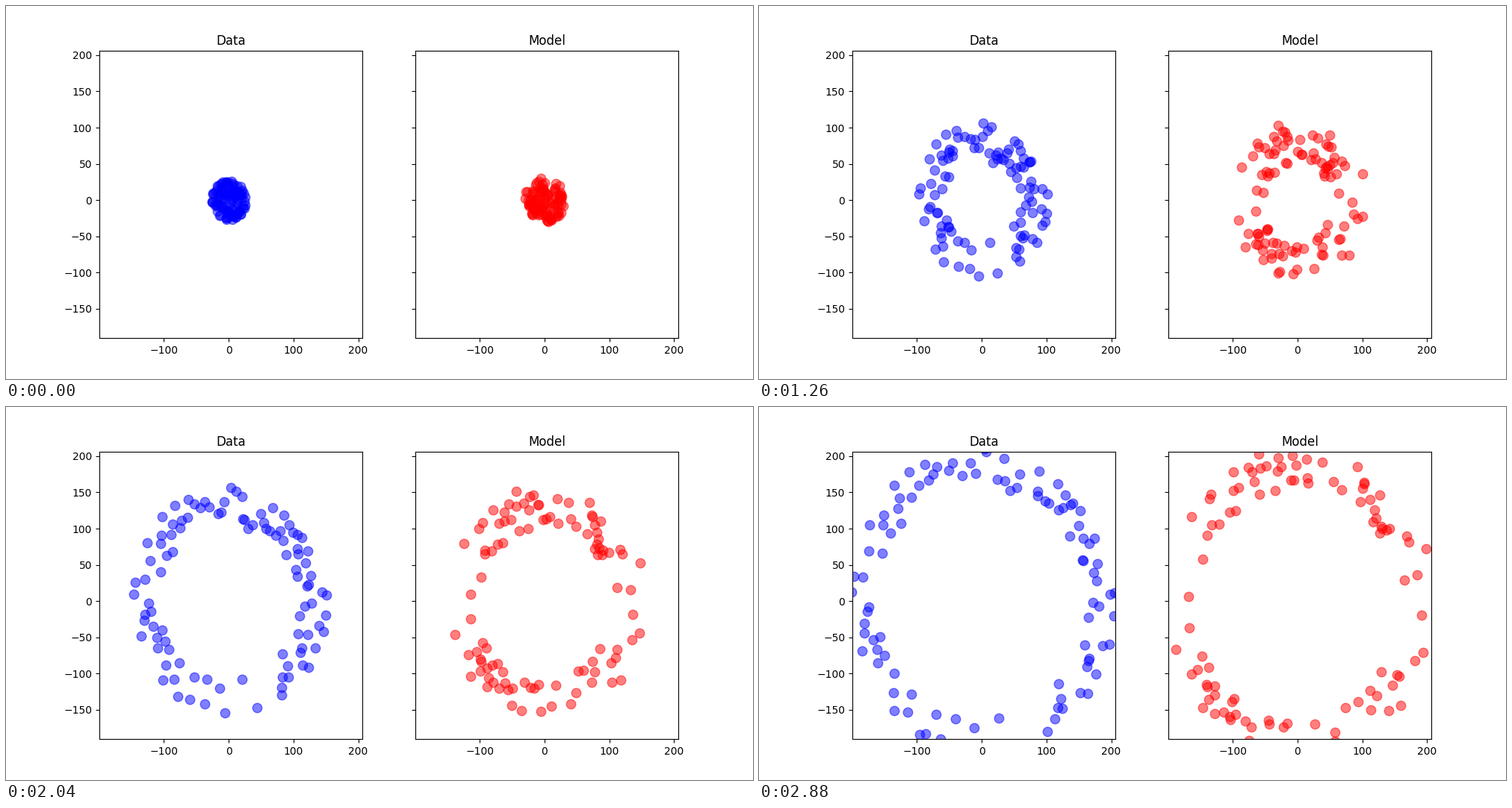
Write a matplotlib script that moves like this. It is 1000x500 px and loops after 2910 ms.

```python
import numpy as np
import matplotlib.pyplot as plt
from matplotlib.animation import FuncAnimation

FRAMES, INTERVAL = 97, 30
MID = 68          # step at which the bearings hold exactly
TRAVEL = 131      # distance covered from the first step to MID
BEND = 4          # spread of the drift in bearing over a loop, degrees

# Particles heading into each 30 degree sector, anticlockwise from the right
DATA_SECTORS = (9, 13, 10, 9, 11, 5, 9, 7, 6, 2, 9, 10)
MODEL_SECTORS = (4, 15, 8, 15, 10, 2, 2, 16, 10, 5, 10, 3)


class Swarm:
    """Particles leaving a small disc at one speed, each on its own heading."""

    def __init__(self, sectors, disc, seed):
        rng = np.random.default_rng(seed)
        width = 2 * np.pi / len(sectors)
        bearing = np.concatenate([
            width * (i + (np.arange(n) + rng.random(n)) / n)
            for i, n in enumerate(sectors)
        ])
        count = len(bearing)
        heading = np.exp(1j * bearing)

        # Real part lies along the heading, imaginary part across it.
        spin = np.exp(2j * np.pi * rng.random(count))
        offset = disc * np.sqrt(rng.random(count)) * spin
        self.start = heading * offset
        self.mid = heading * (TRAVEL + offset.real)
        self.bend = np.radians(rng.normal(0, BEND, count))

    def at(self, step):
        pos = self.start + (self.mid - self.start) * step / MID
        pos = pos * np.exp(1j * self.bend * (step - MID) / FRAMES)
        return pos.real, pos.imag


fig, axes = plt.subplots(1, 2, figsize=(10, 5), dpi=100,
                         sharex=True, sharey=True)
panels = (
    ("Data", "blue", Swarm(DATA_SECTORS, 27, seed=4)),
    ("Model", "red", Swarm(MODEL_SECTORS, 31, seed=9)),
)
dots = []
for ax, (title, color, _) in zip(axes, panels):
    ax.set_title(title)
    ax.set_xlim(-199.55, 206.55)
    ax.set_ylim(-190.2, 206.0)
    dots += ax.plot([], [], "o", color=color, ms=9, alpha=0.5)


def update(step):
    for line, (_, _, swarm) in zip(dots, panels):
        line.set_data(*swarm.at(step))
    return dots


anim = FuncAnimation(fig, update, frames=FRAMES, interval=INTERVAL,
                     repeat=True, repeat_delay=0)
plt.show()
```
